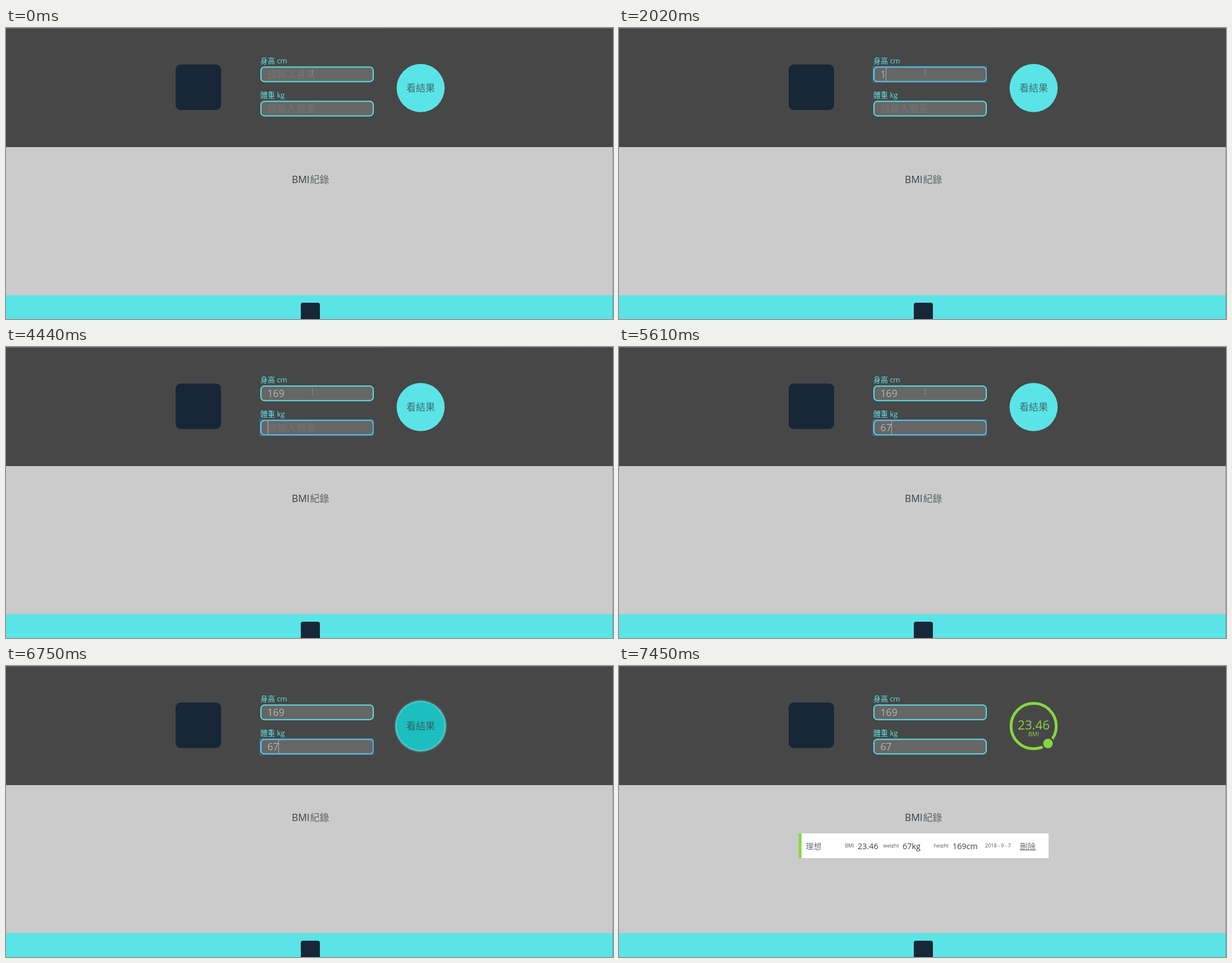
An HTML page for the animation above (8 s loop, 1081 by 518 pixels).

```html
<!DOCTYPE html>
<html lang="zh-Hant">
<head>
<meta charset="utf-8">
<title>BMI紀錄</title>
<style>
  html, body { margin: 0; width: 100%; height: 100%; overflow: hidden; background: #cbcbcb; }
  svg { display: block; font-family: "Open Sans", "Noto Sans CJK TC", "Noto Sans CJK", sans-serif; }
  .label { font-size: 13px; fill: #5be4e7; }
  .field { fill: #666; stroke: #5be4e7; stroke-width: 2; }
  .hint { font-size: 17px; fill: #737373; }
  .value { font-size: 17.7px; fill: #b4b4b4; }
  .thin { fill-opacity: .75; }
  .mid { text-anchor: middle; }
  .card { font-size: 14.4px; fill: #3c4245; }
  .small { font-size: 9px; fill: #555; }
</style>
</head>
<body>
<svg width="1081" height="518" viewBox="0 0 1081 518">
  <defs>
    <filter id="blur" x="-20%" y="-20%" width="140%" height="140%"><feGaussianBlur stdDeviation="1.5"/></filter>
    <clipPath id="cut"><rect x="400" y="300" width="200" height="24"/></clipPath>
  </defs>

  <rect width="1081" height="518" fill="#cbcbcb"/>
  <rect width="1081" height="212" fill="#474747"/>
  <path d="M0 .5H1081" stroke="#707070"/>
  <path d="M672 .5H1074" stroke="#585858" stroke-dasharray="3 2"/>
  <rect y="475.5" width="1081" height="43" fill="#5be4e7"/>
  <path d="M1080.5 212V518" stroke="#000" opacity=".25"/>
  <rect x="302" y="65" width="81" height="81" rx="9" fill="#172737"/>
  <rect x="525" y="489" width="34" height="34" rx="4" fill="#172737"/>

  <text class="label" x="453" y="62.5">身高 cm</text>
  <text class="label" x="453" y="123.5">體重 kg</text>
  <g id="fields"></g>
  <path id="caret" d="M.5 71V94" stroke="#b4b4b4"/>

  <g id="button">
    <circle id="glow" cx="738.4" cy="107" r="45" fill="#5be4e7" filter="url(#blur)"/>
    <circle id="disc" cx="738.4" cy="106.9" r="42.8"/>
    <text class="thin mid" x="738.5" y="113" font-size="17" fill="#384446">看結果</text>
  </g>

  <text x="509" y="276" font-size="17.3" fill="#394044">BMI<tspan class="thin" x="541.5" font-size="17">紀錄</tspan></text>

  <g id="result">
    <g fill="#86d73f">
      <circle cx="738.4" cy="106.9" r="40.3" fill="none" stroke="#86d73f" stroke-width="5"/>
      <circle cx="764" cy="138" r="10" stroke="#474747" stroke-width="3"/>
      <text class="mid" x="738.5" y="113" font-size="22.4">23.46</text>
      <text class="mid" x="738.5" y="125" font-size="10.3">BMI</text>
    </g>
    <rect x="320" y="298" width="445" height="44" fill="#fff"/>
    <rect x="320" y="298" width="5" height="44" fill="#86d73f"/>
    <g class="card">
      <text class="thin" x="332.5" y="325.5" font-size="14">理想</text>
      <text x="425" y="325.5">23.46</text>
      <text x="505" y="325.5">67kg</text>
      <text x="594" y="325.5">169cm</text>
      <text class="thin" x="714" y="325.5" font-size="14">刪除</text>
      <path d="M714 327.5H742" stroke="#444a4d"/>
    </g>
    <g class="small" clip-path="url(#cut)">
      <text x="402.5" y="323">BMI</text>
      <text x="470.5" y="323">weight</text>
      <text x="560.5" y="323">height</text>
    </g>
    <text class="small" x="652" y="323">2018 - 9 - 7</text>
  </g>

  <path id="pointer" d="M-1.5 -4.5H1.5M0 -4.5V4.5M-1.5 4.5H1.5" fill="none"/>
</svg>
<script>
const LOOP = 8000, ROW = 61;
const $ = id => document.getElementById(id);
const show = (el, on) => el.setAttribute('visibility', on ? 'visible' : 'hidden');
// Latest entry whose start time has been reached.
const at = (steps, t) => steps.findLast(step => step[0] <= t);

const typed = [
  [[0, ''], [2020, '1'], [2170, '16'], [3000, '169']],
  [[0, ''], [5020, '6'], [5610, '67']]
];
// Start time, then caret x when it is lit.
const carets = [
  [0], [500, 466], [1050], [1460, 466], [2020, 475], [2170, 485], [2600], [3000, 495],
  [3280, 466], [3870], [4440, 466], [4880], [5020, 475], [5610, 485], [6180],
  [6750, 485], [7180], [7330]
];
const focus = [[0, -1], [500, 0], [3280, 1], [7330, -1]];
const pointers = [
  [0, 545.5, 79.5, '#8c8c8c'], [6330, 580.5, 84.5, '#8c8c8c'], [6450, 636.5, 94.5, '#8c8c8c'],
  [6600, 685.5, 111.5, '#8c8c8c'], [6750], [6900, 732.5, 103, '#384446'],
  [7330, 735.5, 101, '#384446'], [7450, 733.5, 103, '#8a8f84']
];

const fields = ['請輸入身高', '請輸入體重'].map((hint, row) => {
  $('fields').insertAdjacentHTML('beforeend', `<g transform="translate(0 ${row * ROW})">
    <rect class="field" x="454" y="69.6" width="200" height="25.8" rx="6"/>
    <g fill="none" stroke="#4f8ff0">
      <rect x="452.5" y="68.5" width="202" height="28" opacity=".8"/>
      <rect x="453.5" y="69.5" width="200" height="26" rx="5" opacity=".45"/>
    </g>
    <text class="hint" x="466" y="88.5">${hint}</text>
    <text class="value" x="465.5" y="89"></text></g>`);
  const [, ring, placeholder, value] = $('fields').lastElementChild.children;
  return { ring, placeholder, value };
});

function draw() {
  const t = performance.now() % LOOP;
  const active = at(focus, t)[1];
  fields.forEach(({ ring, placeholder, value }, row) => {
    const text = at(typed[row], t)[1];
    value.textContent = text;
    show(placeholder, !text);
    show(ring, row === active);
  });

  const caretX = at(carets, t)[1];
  show($('caret'), caretX);
  if (caretX) $('caret').setAttribute('transform', `translate(${caretX} ${active * ROW})`);

  const done = t >= 7450, hover = t >= 6750 && !done;
  $('button').setAttribute('display', done ? 'none' : 'inline');
  show($('glow'), hover);
  $('disc').setAttribute('fill', hover && t < 7330 ? '#1cbec0' : '#5be4e7');
  show($('result'), done);

  const [, x, y, color] = at(pointers, t);
  show($('pointer'), x);
  if (x) {
    $('pointer').setAttribute('transform', `translate(${x} ${y})`);
    $('pointer').setAttribute('stroke', color);
  }
  requestAnimationFrame(draw);
}
draw();
</script>
</body>
</html>
```
